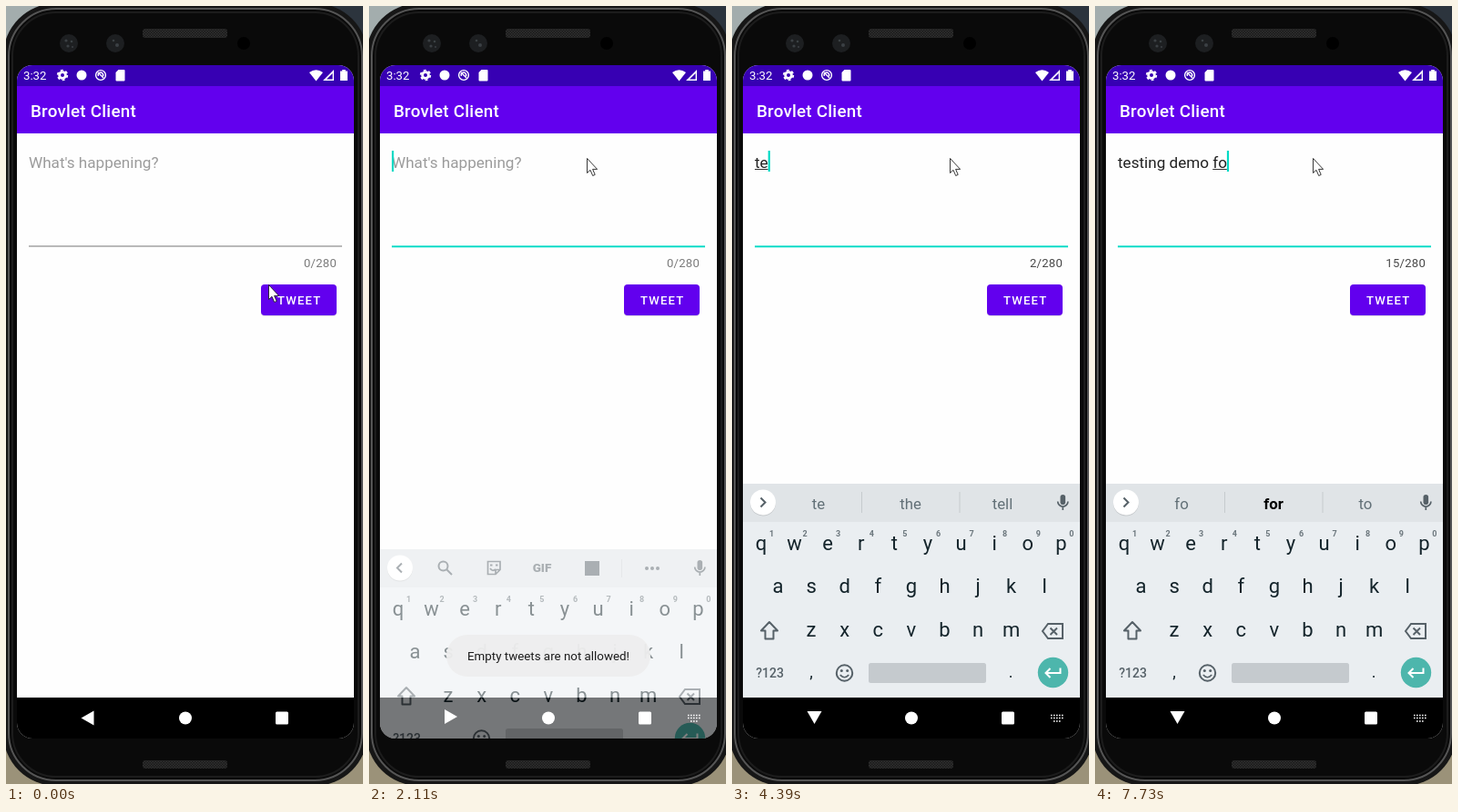
These frames come from a looping animation (392 px wide and 855 px high, 7.99 s). An HTML page:

```html
<!DOCTYPE html>
<html lang="en">
<head>
<meta charset="utf-8">
<title>Post composer demo</title>
<style>
  html, body { margin: 0; width: 100%; height: 100%; overflow: hidden; background: #000; }
  svg { display: block; }
  text { font-family: Roboto, sans-serif; white-space: pre; }
  .mid text, text.mid { text-anchor: middle; }
  .line { fill: none; stroke: #566168; stroke-width: 2; }
  .icon { fill: #566168; }
</style>
</head>
<body>
<svg width="392" height="855" viewBox="0 0 392 855">
  <defs>
    <clipPath id="screenClip"><rect x="12" y="65" width="370" height="740" rx="17"/></clipPath>
    <pattern id="mesh" width="3" height="3" patternUnits="userSpaceOnUse">
      <rect width="3" height="3" fill="#191919"/>
      <path d="M0 0h1.5v1.5h-1.5zM1.5 1.5h1.5v1.5h-1.5z" fill="#303030"/>
    </pattern>
  </defs>

  <!-- phone body -->
  <rect width="196" height="428" fill="#a3adad"/>
  <rect x="196" width="196" height="428" fill="#2c343d"/>
  <rect y="428" width="392" height="427" fill="#9b9279"/>
  <rect x="-3" y="-3" width="400" height="860" rx="58" fill="#161616"/>
  <rect x="3" y="3" width="388" height="848" rx="52" fill="#0a0a0a" stroke="#555" stroke-width="2"/>
  <rect x="7" y="7" width="380" height="840" rx="48" fill="#0a0a0a" stroke="#1c1c1c" stroke-width="2"/>
  <rect x="150" y="25" width="93" height="10" rx="3" fill="url(#mesh)"/>
  <rect x="150" y="829" width="93" height="9" rx="3" fill="url(#mesh)"/>
  <g fill="#1d1f21">
    <circle cx="69" cy="41" r="10"/><circle cx="120" cy="41" r="10"/>
    <g fill="#3b4044">
      <circle cx="66" cy="38" r="1.6"/><circle cx="72" cy="39" r="1.3"/><circle cx="68" cy="44" r="1.6"/><circle cx="73" cy="45" r="1"/>
      <circle cx="118" cy="38" r="1.3"/><circle cx="122" cy="43" r="2"/>
    </g>
  </g>
  <circle cx="261" cy="41" r="7" fill="#000"/>

  <g clip-path="url(#screenClip)">
    <rect x="12" y="65" width="370" height="740" fill="#fefefe"/>
    <rect x="12" y="65" width="370" height="23" fill="#3700b3"/>
    <rect x="12" y="88" width="370" height="52" fill="#6200ee"/>
    <rect x="12" y="760" width="370" height="45" fill="#000"/>

    <!-- status bar -->
    <g fill="#fff">
      <text x="19" y="81" font-size="13.2">3:32</text>
      <circle cx="62" cy="76" r="3.4" fill="none" stroke="#fff" stroke-width="2.8"/>
      <circle cx="62" cy="76" r="5.3" fill="none" stroke="#fff" stroke-width="1.8" stroke-dasharray="2.8 2.75"/>
      <circle cx="83" cy="76" r="5.5"/>
      <circle cx="104" cy="76" r="5.4" fill="none" stroke="#fff" stroke-width="1.4"/>
      <path d="M101 73l6 6M101.5 77a2.7 2.7 0 1 1 4 1" fill="none" stroke="#fff" stroke-width="1.4"/>
      <path d="M123.500 70h6q1 0 1 1v10.500q0 1-1 1h-8q-1 0-1-1v-8.500z"/>
      <path d="M333 73q7.5-5.5 15 0l-7.5 9.500z"/>
      <path d="M360 70v12h-12zM358.600 74v6.600h-6.600z" fill-rule="evenodd"/>
      <path d="M367 71.500h2.200v-1.500h3.600v1.500h2.200v10.500h-8z"/>
    </g>
    <text x="27" y="121.500" font-size="18.800" font-weight="500" letter-spacing=".25" fill="#fff">Brovlet Client</text>

    <!-- form -->
    <text id="input" x="25" y="177.500" font-size="17.100"></text>
    <path id="composing" stroke="#333" stroke-width="1"/>
    <rect id="caret" y="159" width="2.200" height="23" fill="#03dac5"/>
    <rect id="fieldLine" x="25" width="344"/>
    <text id="counter" x="363" y="286.500" font-size="13.100" letter-spacing=".25" text-anchor="end"></text>
    <rect x="280" y="306.500" width="83" height="34.500" rx="4" fill="#000" opacity=".1"/>
    <rect x="280" y="306" width="83" height="34" rx="4" fill="#6200ee"/>
    <rect id="ripple" x="280" y="306" width="83" height="34" rx="4" fill="#fff"/>
    <text x="298" y="328" font-size="13.100" font-weight="500" letter-spacing="1.170" fill="#fff">TWEET</text>

    <!-- keyboard -->
    <g id="keyboard">
      <rect x="12" y="525" width="370" height="235" fill="#eaeef1"/>
      <rect x="12" y="525" width="370" height="42" fill="#e0e4e7"/>
      <circle cx="34" cy="546.500" r="14" fill="#000" opacity=".12"/>
      <circle cx="34" cy="545.500" r="14" fill="#fff"/>
      <path id="chevron" class="line"/>
      <g id="tools">
        <circle cx="81.500" cy="543.500" r="5" class="line"/>
        <path d="M85 547l6 6" class="line" stroke-width="2.400"/>
        <path d="M130.500 538.500h13.500v9l-5 5h-8.500zM144 547.500h-5v5M133 546q2.500 4 6 1" class="line" style="stroke-width:1.700"/>
        <path d="M133 541.500h2.500v2h-2.500zM139 541.500h2.500v2h-2.500z" class="icon"/>
        <text x="190" y="550.300" class="icon mid" font-size="13.500" font-weight="900">GIF</text>
        <rect x="237" y="538" width="16" height="16" class="icon"/>
        <path d="M277.500 536v20" stroke="#cbd0d3"/>
        <g class="icon"><circle cx="305" cy="546" r="2"/><circle cx="311" cy="546" r="2"/><circle cx="317" cy="546" r="2"/></g>
      </g>
      <g id="suggestions" class="mid" font-size="16.800">
        <path d="M142.500 534v23M250 534v23" stroke="#c6cbce"/>
        <text x="95" y="552.500"></text><text x="196" y="552.500"></text><text x="297" y="552.500"></text>
      </g>
      <rect x="360.500" y="537" width="5.600" height="11" rx="2.800" class="icon"/>
      <path d="M357.700 544.500a5.600 5.600 0 0 0 11.200 0M363.300 550v4" class="line" style="stroke-width:1.700"/>
      <g id="keys" class="mid"></g>
      <path d="M41 677l9 9.500h-4.500v9h-9v-9h-4.500z" class="line" stroke-linejoin="round"/>
      <path d="M347 679h16v16h-16l-6-8zM349.500 683.500l7.500 7.500M357 683.500l-7.500 7.500" class="line"/>
      <text x="41.500" y="738" class="mid" font-size="14" font-weight="500" fill="#566168">?123</text>
      <circle cx="123.500" cy="733" r="8.700" class="line"/>
      <path d="M118.800 735q4.700 5.500 9.400 0" class="line" style="stroke-width:1.700"/>
      <g class="icon"><circle cx="120.300" cy="730.500" r="1.500"/><circle cx="126.700" cy="730.500" r="1.500"/></g>
      <rect x="150" y="722" width="129" height="22" rx="2.500" fill="#c5cace"/>
      <circle cx="352.500" cy="732.500" r="16.700" fill="#4db6ac"/>
      <path d="M360.500 727.500v5.500h-15.500M349.500 728l-5 5 5 5" fill="none" stroke="#fff" stroke-width="2"/>
    </g>

    <!-- navigation bar -->
    <g fill="#fff">
      <path id="back" d="M82.500 782.500l14-8v16z"/>
      <circle cx="197" cy="782.500" r="7"/>
      <rect x="296" y="775.500" width="14" height="14" rx="1.500"/>
      <path id="imeIcon" d="M350 779.500h14M350 782.500h14M353 786h8" fill="none" stroke="#fff" stroke-width="1.500" stroke-dasharray="1.600 1.400"/>
    </g>

    <g id="toast">
      <rect id="toastPill" x="85" y="691" width="224" height="46" rx="23" fill="#eee"/>
      <text x="197" y="719" class="mid" font-size="13.350" fill="#1c1c1c">Empty tweets are not allowed!</text>
    </g>
  </g>
  <path id="pointer" d="M.5 .5v16l3.500-3.200 2.700 6.200 2.500-1.100-2.600-6h5z" fill="#fff" stroke="#222" stroke-width=".9"/>
</svg>
<script>
const LOOP = 7990;
const MESSAGE = 'testing demo fo';
const $ = id => document.getElementById(id);
const set = (id, attrs) => { for (const k in attrs) $(id).setAttribute(k, attrs[k]); };
const ruler = document.createElement('canvas').getContext('2d');
const widthOf = text => { ruler.font = '17.1px Roboto, sans-serif'; return ruler.measureText(text).width; };

// Stepped tracks: [start in ms, value...]
const pointer = [[0, 288, 306], [150, 303, 321], [270, 310, 327], [710, 304, 317], [850, 281, 281],
  [970, 265, 248], [1100, 251, 211], [1240, 243, 184], [1390, 240, 171], [1540, 239, 167]];
const ripple = [[0, 0], [580, .22], [710, .12], [850, 0]];
const toast = [[0, 0], [710, .1], [850, .38], [970, .75], [1100, 1], [2760, .6], [2900, .25], [3050, 0]];
const keyboard = [[0, 235, 0], [1970, 135, .2], [2110, 72, .5], [2250, 20, .85], [2490, 0, 1]];
const backAngle = [[0, 0], [1970, 90], [2110, 180], [2250, 240], [2490, 270]];
const caret = [[0, 0], [1840, 1], [2490, 0], [2900, 1], [3450, 0], [3960, 1], [6150, 0], [6710, 1]];
const typed = [[0, 0], [3960, 1], ...Array.from({ length: 7 }, (_, i) => [4270 + 130 * i, i + 2]),
  [5350, 9], [5500, 11], [5650, 12], [7170, 13], [7420, 14], [7730, 15]];
// Suggestions by typed length; * marks the autocorrect choice
const suggestions = {
  1: 't|the|to', 2: 'te|the|tell', 3: 'tes|*yes|test', 4: 'test|tests|testing', 5: 'testi|*testing|tests',
  6: 'testin|*testing|test', 7: 'testing|tests|test', 8: 'and|Brovlet|the', 9: 'd|do|day',
  11: 'dem|*demo|den', 12: 'demo|demon|Demolarks', 13: 'of|and|for', 14: 'f|for|of', 15: 'fo|*for|to'
};
const at = (track, t) => track.findLast(step => step[0] <= t).slice(1);

function buildKeys() {
  const key = (x, y, label, attrs) => `<text x="${x}" y="${y}" ${attrs}>${label}</text>`;
  const letter = 'font-size="22" fill="#14242b"';
  const row = (letters, x, y) => [...letters].map((c, i) => key(x + 36.6 * i, y, c, letter)).join('');
  const digits = [...'1234567890'].map((d, i) =>
    key(43.5 + 36.6 * i, 583, d, 'font-size="9" font-weight="700" fill="#6b767c"')).join('');
  $('keys').innerHTML = row('qwertyuiop', 32, 598) + row('asdfghjkl', 50.5, 645) + row('zxcvbnm', 87, 693) +
    digits + key(87, 738, ',', 'font-size="18" fill="#14242b"') + key(306, 738, '.', 'font-size="18" fill="#14242b"');
}

function render(t) {
  const [count] = at(typed, t);
  const text = MESSAGE.slice(0, count);
  const end = 25 + widthOf(text);
  const wordStart = text.lastIndexOf(' ') + 1;
  const focused = t >= 1840;

  $('input').textContent = text || "What's happening?";
  set('input', { fill: count ? '#212121' : '#9b9b9b' });
  set('composing', { d: wordStart < count ? `M${25 + widthOf(text.slice(0, wordStart))} 179.500H${end}` : '' });
  set('caret', { x: end, opacity: at(caret, t)[0] });
  set('fieldLine', focused ? { y: 263.4, height: 1.9, fill: '#03dac5' } : { y: 263.4, height: 1.2, fill: '#8e8e8e' });
  $('counter').textContent = count + '/280';
  set('counter', { fill: count ? '#484848' : '#7b7b7b' });
  set('ripple', { opacity: at(ripple, t)[0] });

  const [drop, alpha] = at(keyboard, t);
  set('keyboard', { transform: `translate(0 ${drop})`, opacity: alpha });
  set('tools', { visibility: count ? 'hidden' : 'visible' });
  set('suggestions', { visibility: count ? 'visible' : 'hidden' });
  set('chevron', { d: count ? 'M31.500 540.500l5 5-5 5' : 'M36 540.500l-5 5 5 5' });
  const words = (suggestions[count] || '||').split('|');
  $('suggestions').querySelectorAll('text').forEach((el, i) => {
    const best = words[i][0] === '*';
    el.textContent = words[i].replace('*', '');
    el.setAttribute('fill', best ? '#000' : '#627077');
    el.setAttribute('font-weight', best ? 700 : 400);
  });

  set('back', { transform: `rotate(${at(backAngle, t)[0]} 89.75 781.75)` });
  set('imeIcon', { opacity: alpha ? 1 : 0 });
  set('toast', { opacity: at(toast, t)[0] });
  set('toastPill', { opacity: alpha ? .94 : 0 });
  set('pointer', { transform: `translate(${at(pointer, t).join(' ')})` });
}

buildKeys();
const start = performance.now();
(function frame() {
  render((performance.now() - start) % LOOP);
  requestAnimationFrame(frame);
})();
</script>
</body>
</html>
```
